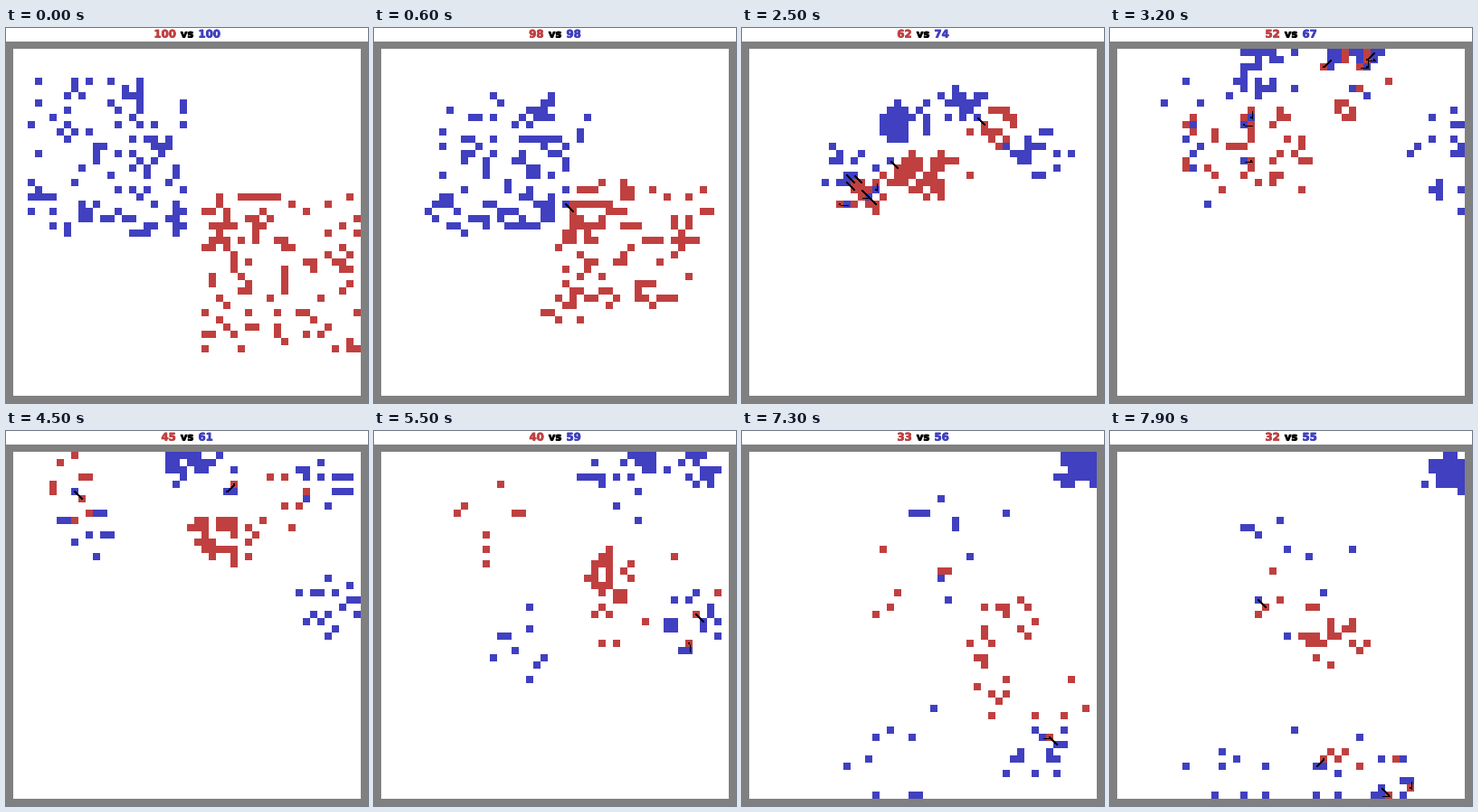
Write a matplotlib script that moves like this. It is 400 by 415 pixels and loops after 8 s.

```python
from itertools import product

import matplotlib.pyplot as plt
import numpy as np
from matplotlib.animation import FuncAnimation
from matplotlib.collections import LineCollection
from matplotlib.patches import Rectangle
from matplotlib.patheffects import withStroke

W, H, DPI = 400, 415, 80
GRID, CELL, LEFT, TOP = 48, 8, 8, 23
FRAMES, INTERVAL = 80, 100
CLASH = 15
RED, BLUE, GRAY = "#c04040", "#4040c0", "#808080"
RGB = {"red": (192, 64, 64), "blue": (64, 64, 192)}
PX = 72 / DPI

rng = np.random.default_rng(11)

# Strength of both sides and number of strikes over time.
TIMES = [0, 5, 15, 32, 45, 62, 73, 79]
ALIVE = {"blue": [100, 100, 85, 67, 61, 57, 56, 55],
         "red": [100, 100, 77, 52, 45, 36, 33, 32]}
STRIKES = [0, 0, 16, 8, 3, 1, 2, 5]

# After the clash: share of the army, then (time, x, y, radius) on its way.
BLUE_SQUADS = [
    (0.20, [(32, 10, 12, 9), (45, 8, 10, 6), (62, 23, 37, 7), (79, 14, 42, 11)]),
    (0.20, [(32, 19, 3, 5), (45, 26, 2, 6), (62, 34, 5, 6), (79, 22, 14, 12)]),
    (0.15, [(32, 20, 2, 4), (45, 23, 1, 4), (62, 45, 1, 2), (79, 45, 2, 3)]),
    (0.25, [(32, 33, 1, 5), (45, 43, 4, 4), (62, 45, 1, 2), (79, 45, 3, 3)]),
    (0.20, [(32, 45, 15, 7), (45, 43, 21, 5), (62, 41, 24, 5),
            (73, 39, 41, 4), (79, 33, 44, 8)]),
]
RED_SQUADS = [
    (0.25, [(32, 13, 14, 6), (45, 10, 5, 7), (62, 22, 14, 11), (79, 24, 21, 8)]),
    (0.55, [(32, 21, 14, 6), (45, 28, 12, 4), (62, 33, 21, 3),
            (73, 34, 26, 6), (79, 29, 26, 4)]),
    (0.20, [(32, 32, 4, 6), (45, 34, 8, 7), (62, 38, 30, 14),
            (73, 39, 34, 7), (79, 34, 43, 7)]),
]


def rank(values):
    return values.argsort().argsort() / len(values)


def block(x0, y0, size=22, n=100):
    """Random distinct cells in a square."""
    spots = rng.choice(size * size, n, replace=False)
    return np.column_stack([x0 + spots % size, y0 + spots // size]).astype(float)


def battle_line(home, side):
    """Close ranks along the curved front; side is -1 above it, 1 below."""
    along = rank(home[:, 0] - home[:, 1])
    back = rank(side * home.sum(1))
    reach = 7 if side < 0 else 9 * (0.4 + 0.6 * along)
    depth = side * (0.7 + reach * back ** 1.5) * np.sqrt(0.5)
    knots = [0, 0.3, 0.7, 1]
    x = np.interp(along, knots, [18, 23, 27, 36])
    y = np.interp(along, knots, [28, 22.5, 17, 15])
    return along, np.column_stack([x + depth, y + depth])


def march(team, home, side, squads):
    """Wanted positions of the living soldiers for every frame."""
    along, line = battle_line(home, side)
    squad = np.searchsorted(np.cumsum([share for share, _ in squads])[:-1],
                            along, side="right")
    angle, phase = rng.uniform(0, 2 * np.pi, (2, len(home)))
    radius = np.sqrt(rng.random(len(home)))
    order = rng.permutation(len(home))
    routes = []
    for i, s in enumerate(squad):
        t, x, y, r = np.array(squads[s][1]).T
        turn = angle[i] + 0.03 * t
        routes.append((np.r_[0, CLASH, t],
                       np.r_[home[i, 0], line[i, 0], x + r * radius[i] * np.cos(turn)],
                       np.r_[home[i, 1], line[i, 1], y + r * radius[i] * np.sin(turn)]))
    track = []
    for f in range(FRAMES):
        spots = np.array([(np.interp(f, t, x), np.interp(f, t, y))
                          for t, x, y in routes])
        sway = 0.8 * min(1, f / 4)
        spots += sway * np.column_stack([np.sin(0.8 * f + phase),
                                         np.cos(0.6 * f + angle)])
        track.append(spots[order < round(np.interp(f, TIMES, ALIVE[team]))])
    return track


NEAR = sorted(product(range(-8, 9), repeat=2),
              key=lambda d: d[0] ** 2 + d[1] ** 2)


def settle(wanted, taken):
    """Snap to the grid, stepping aside from occupied cells."""
    cells = []
    for x, y in np.clip(np.rint(wanted), 0, GRID - 1).astype(int).tolist():
        for dx, dy in NEAR:
            p = x + dx, y + dy
            if p not in taken and 0 <= min(p) and max(p) < GRID:
                taken.add(p)
                cells.append(p)
                break
    return np.array(cells)


def strikes(blue, red, count):
    """Soldiers closest to an enemy strike at the next cell."""
    found = []
    for own, foe in ((blue, red), (red, blue)):
        gap = foe[None] - own[:, None]
        dist = np.abs(gap).max(2)
        for i, j in enumerate(dist.argmin(1)):
            found.append((dist[i, j] + 0.9 * rng.random(), own[i],
                          own[i] + np.sign(gap[i, j])))
    found.sort(key=lambda s: s[0])
    return np.array([(a, b) for _, a, b in found[:count]]).reshape(-1, 2, 2)


def simulate():
    blue_track = march("blue", block(2, 4), -1, BLUE_SQUADS)
    red_track = march("red", block(26, 20), 1, RED_SQUADS)
    scenes = []
    for f in range(FRAMES):
        taken = set()
        blue = settle(blue_track[f], taken)
        red = settle(red_track[f], taken)
        count = round(np.interp(f, TIMES, STRIKES))
        scenes.append((blue, red, strikes(blue, red, count)))
    return scenes


scenes = simulate()

fig = plt.figure(figsize=(W / DPI, H / DPI), dpi=DPI, facecolor="white")
ax = fig.add_axes([0, 0, 1, 1])
ax.axis("off")
ax.add_patch(Rectangle((0, 15), W, W, color=GRAY, lw=0, antialiased=False))
field = ax.imshow(np.full((GRID, GRID, 3), 255, np.uint8),
                  extent=(LEFT, LEFT + GRID * CELL, TOP + GRID * CELL, TOP),
                  interpolation="nearest", aspect="auto", zorder=2)
ax.set_xlim(0, W)
ax.set_ylim(H, 0)
strokes = ax.add_collection(LineCollection([], colors="black",
                                           linewidths=0.75 * PX,
                                           antialiaseds=False, zorder=3))
tips, = ax.plot([], [], "s", color="black", ms=2 * PX, mew=0,
                antialiased=False, zorder=3)


def label(x, text, color, align):
    return ax.text(x, 10.5, text, color=color, ha=align, va="baseline",
                   family="DejaVu Sans", weight="bold", fontsize=11.7 * PX,
                   path_effects=[withStroke(linewidth=0.7, foreground=color)])


red_label = label(187.5, "", RED, "right")
label(200, "vs", "black", "center")
blue_label = label(212.5, "", BLUE, "left")


def draw(f):
    blue, red, hits = scenes[f]
    img = np.full((GRID, GRID, 3), 255, np.uint8)
    for team, cells in (("blue", blue), ("red", red)):
        img[cells[:, 1], cells[:, 0]] = RGB[team]
    field.set_data(img)
    lines = (hits + 0.5) * CELL + (LEFT, TOP)
    strokes.set_segments(list(lines + 0.5))
    tips.set_data(lines[:, 1, 0], lines[:, 1, 1])
    red_label.set_text(str(len(red)))
    blue_label.set_text(str(len(blue)))
    return field, strokes, tips, red_label, blue_label


anim = FuncAnimation(fig, draw, frames=FRAMES, interval=INTERVAL,
                     repeat=True, repeat_delay=0)
plt.show()
```
